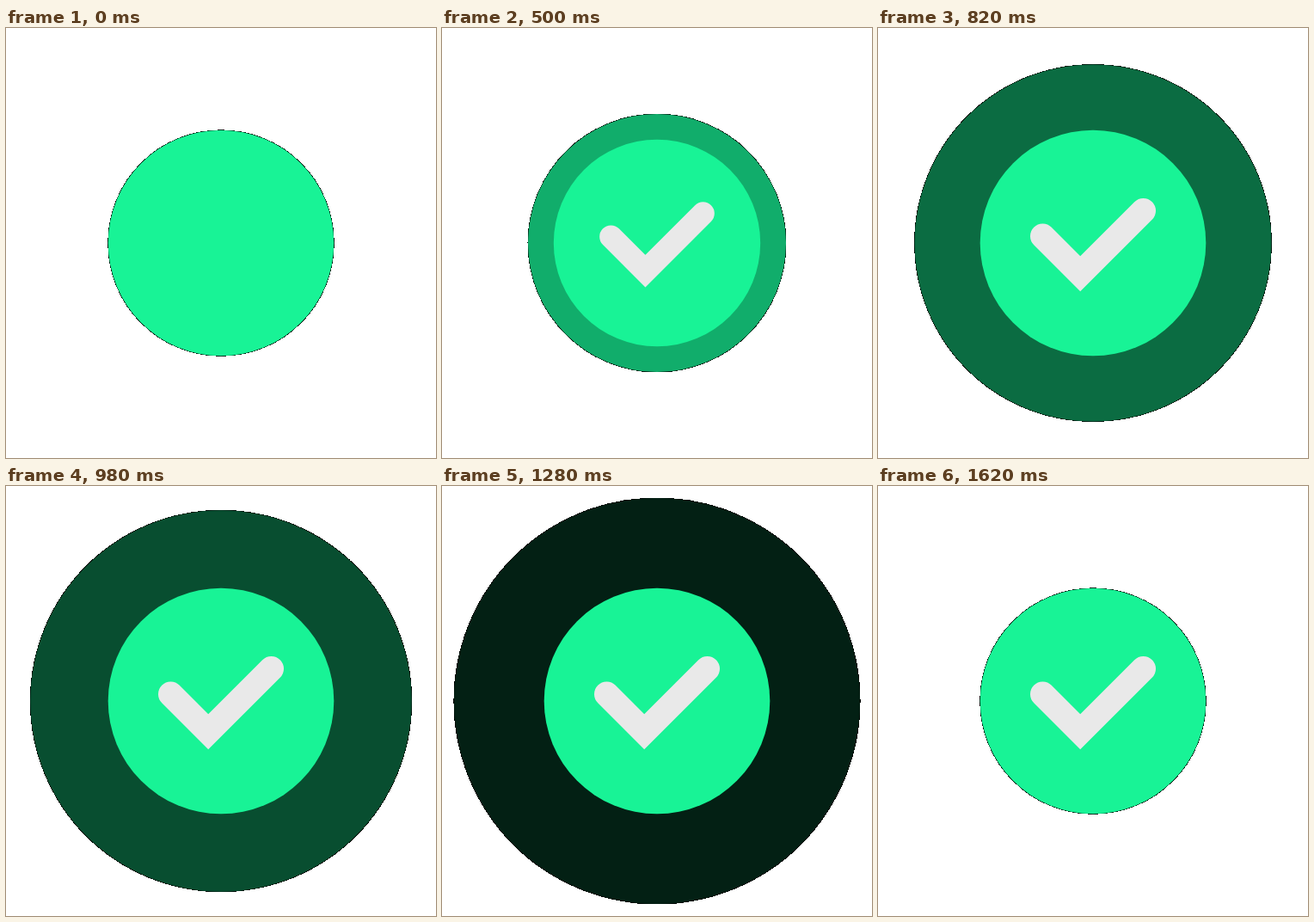
An HTML page with a canvas for the animation above (2420 ms loop, 500 px wide and 500 px high).

```html
<!DOCTYPE html>
<html lang="en">
<head>
<meta charset="utf-8">
<title>Success check</title>
<style>
  html, body { margin: 0; width: 100%; height: 100%; overflow: hidden; background: #fff; }
  canvas { display: block; width: 500px; height: 500px; }
</style>
</head>
<body>
<canvas id="stage" width="500" height="500"></canvas>
<script>
const SIZE = 500, CENTER = 250;
const LOOP = 2420, STEP = 20, START = 200, END = 1620;
const GREEN = [24, 243, 150];
const DISC_RADIUS = 131.3;
const CHECK = [[191.5, 242], [235.2, 285.7], [308.5, 212.4]];

const ctx = document.getElementById('stage').getContext('2d', { willReadFrequently: true });
const clamp = v => Math.min(1, Math.max(0, v));
const progress = (t, from, to) => clamp((t - from) / (to - from));
const shade = k => `rgb(${GREEN.map(c => Math.round(c * k)).join(',')})`;

function disc(radius, color) {
  ctx.fillStyle = color;
  ctx.beginPath();
  ctx.arc(CENTER, CENTER, radius, 0, 2 * Math.PI);
  ctx.fill();
}

// Strokes the first part of the check mark, measured along its length.
function check(part) {
  const lengths = [1, 2].map(i =>
    Math.hypot(CHECK[i][0] - CHECK[i - 1][0], CHECK[i][1] - CHECK[i - 1][1]));
  let left = part * (lengths[0] + lengths[1]);
  ctx.beginPath();
  ctx.moveTo(...CHECK[0]);
  for (let i = 0; i < 2 && left > 0; i++) {
    const k = Math.min(1, left / lengths[i]);
    const [ax, ay] = CHECK[i], [bx, by] = CHECK[i + 1];
    ctx.lineTo(ax + (bx - ax) * k, ay + (by - ay) * k);
    left -= lengths[i];
  }
  ctx.strokeStyle = '#e9e9e9';
  ctx.lineWidth = 29;
  ctx.lineCap = 'round';
  ctx.lineJoin = 'miter';
  ctx.stroke();
}

// Soft edge pixels turn dark, untouched pixels stay clear.
function hardenEdges() {
  const image = ctx.getImageData(0, 0, SIZE, SIZE), px = image.data;
  for (let i = 0; i < px.length; i += 4) {
    const a = px[i + 3];
    if (a === 0 || a === 255) continue;
    for (let c = 0; c < 3; c++) px[i + c] = px[i + c] * a / 255;
    px[i + 3] = 255;
  }
  ctx.putImageData(image, 0, 0);
}

function draw(t) {
  ctx.clearRect(0, 0, SIZE, SIZE);
  if (t >= START && t < END) {
    const radius = 247 - 69.3 * Math.exp(-0.0028 * (t - 620));
    disc(radius, shade(Math.pow((END - t) / (END - START), 1.42)));
  }
  const dip = 1 - Math.abs(2 * progress(t, START, 720) - 1);
  const scale = 1 - 0.1 * dip;
  ctx.save();
  ctx.translate(CENTER, CENTER);
  ctx.scale(scale, scale);
  ctx.translate(-CENTER, -CENTER);
  disc(DISC_RADIUS, shade(1));
  if (t >= START) check(progress(t, 190, 402));
  ctx.restore();
  hardenEdges();
}

const origin = performance.now();
let shown = -1;
function tick() {
  const time = (performance.now() - origin) % LOOP;
  const t = Math.floor(time / STEP) * STEP;
  if (t !== shown) draw(shown = t);
  requestAnimationFrame(tick);
}
tick();
</script>
</body>
</html>
```
